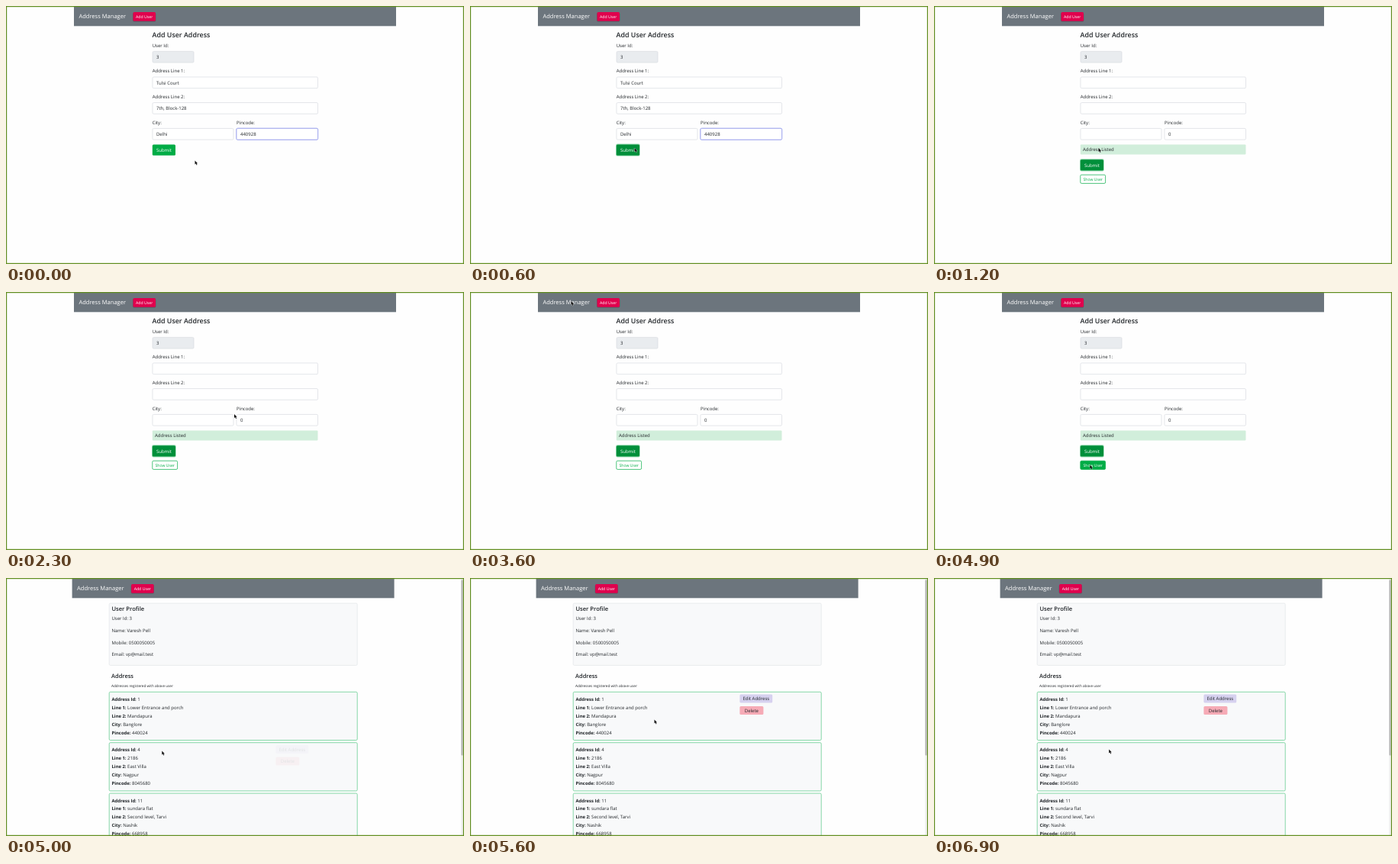
Recreate the animation shown at these times as an HTML page. Size 600 by 338 pixels, loop 7000 ms.

```html
<!DOCTYPE html>
<html>
<head>
<meta charset="utf-8">
<style>
html, body { margin: 0; width: 100%; height: 100%; overflow: hidden; background: #fefefe; }
svg { display: block; width: 600px; height: 338px; }
text { font: 6px "Open Sans", "Noto Sans", sans-serif; fill: #212529; text-rendering: geometricPrecision; white-space: pre; }
</style>
</head>
<body>
<svg id="stage" viewBox="0 0 600 338"></svg>
<script>
const stage = document.getElementById('stage');
const INK = '#212529', GREEN = '#00ac46', DARK = '#008f3a', LINE = '#d8dce1';

const rect = (x, y, w, h, fill, stroke = 'none', r = 1.5, extra = '') =>
  `<rect x="${x}" y="${y}" width="${w}" height="${h}" rx="${r}" fill="${fill}" stroke="${stroke}" stroke-width=".7" ${extra}/>`;
const text = (x, y, str, size = 6, weight = 400, fill = INK, anchor = 'start') =>
  `<text x="${x}" y="${y}" style="font-size:${size}px;font-weight:${weight};fill:${fill}" text-anchor="${anchor}">${str}</text>`;
const group = (id, body) => `<g id="${id}">${body}</g>`;

const nav = x =>
  rect(x, 1, 422, 25.3, '#6c757d', 'none', 0) +
  text(x + 6.4, 15.8, 'Address Manager', 7.55, 400, '#fff') +
  rect(x + 77, 8.8, 30.4, 12, '#000', 'none', 2, 'opacity=".18"') +
  rect(x + 77.5, 8, 29.5, 11.7, '#e0004d') +
  text(x + 92.2, 15.6, 'Add User', 5.2, 400, '#fff', 'middle');

const input = (x, y, w, value = '', fill = '#fff') =>
  rect(x, y, w, 14.7, fill, LINE) + text(x + 5, y + 9.5, value);

const submit = (y, fill, ring) =>
  (ring ? rect(191, y - 1, 31.8, 16.2, '#9bdcb4', 'none', 2.2) : '') +
  rect(191.8, y, 30.2, 14.3, fill) +
  text(206.9, y + 9.3, 'Submit', 6, 400, '#fff', 'middle');

const showUser = (fill, ink) =>
  rect(191.8, 221.2, 32.8, 11.2, fill, GREEN) +
  text(208.2, 228.6, 'Show User', 5.15, 400, ink, 'middle');

const formPage =
  nav(89) +
  text(191.6, 41.3, 'Add User Address', 8.9, 600) +
  text(191.7, 53.6, 'User Id:') + input(192, 59.4, 54, '3', '#e9ecef') +
  text(191.7, 87.3, 'Address Line 1:') + input(192, 93, 216.5) +
  text(191.7, 121, 'Address Line 2:') + input(192, 126.6, 216.5) +
  text(191.7, 154.6, 'City:') + input(192, 160.4, 106) +
  text(302, 154.6, 'Pincode:') + input(302, 160.4, 106.5) +
  group('filled',
    text(197, 102.5, 'Tulsi Court') + text(197, 136.1, '7th, Block-128') + text(197, 169.9, 'Delhi') +
    rect(301.6, 160, 107.3, 15.5, '#fff', '#b9bdf5', 2) +
    rect(302, 160.4, 106.5, 14.7, '#fff', '#8f97ea') + text(307, 169.9, '440928') +
    group('idle', submit(181.5, GREEN)) + group('pressed', submit(181.5, DARK, true))) +
  group('listed',
    text(307, 169.9, '0') +
    rect(191.8, 181.5, 216.7, 13, '#d1eedb', 'none', 1) +
    text(195, 190.2, 'Address Listed') +
    submit(201.2, DARK, true) +
    group('outline', showUser('#fff', GREEN)) + group('solid', showUser(GREEN, '#fff')));

const cards = [
  ['1', 'Lower Entrance and porch', 'Mandapura', 'Banglore', '440024'],
  ['4', '2186', 'East Villa', 'Nagpur', '8045680'],
  ['11', 'sundara flat', 'Second level, Tarvi', 'Nashik', '668958']
];
const labels = ['Address Id:', 'Line 1:', 'Line 2:', 'City:', 'Pincode:'];

const card = (values, i) => {
  const y = 149.3 + i * 66.4;
  const rows = values.map((v, k) => text(138.5, y + 11.4 + k * 10.95,
    `<tspan style="font-size:5.9px;font-weight:700">${labels[k]}</tspan> ${v}`)).join('');
  const actions = group('actions' + i,
    rect(353.4, y + 3.2, 42.8, 11, '#d6d1ef') + text(374.8, y + 10.9, 'Edit Address', 6, 400, INK, 'middle') +
    rect(353.4, y + 18.8, 31, 11, '#f6abb6') + text(368.9, y + 26.5, 'Delete', 6, 400, INK, 'middle'));
  return rect(135.2, y, 325, 63.2, '#f8f9fa', '#55c985') + rows + actions;
};

const profilePage =
  nav(86.6) +
  rect(135.2, 33.1, 325, 81.3, '#f8f9fa', '#e3e5e8') +
  text(138.4, 43.4, 'User Profile', 7.6, 600) +
  ['User Id: 3', 'Name: Varesh Pell', 'Mobile: 0500050005', 'Email: vp@mail.test']
    .map((s, i) => text(138.5, 55.3 + i * 15.67, s)).join('') +
  text(138, 131.3, 'Address', 7.5, 600) +
  text(138, 143.2, 'Addresses registered with above user', 4.65) +
  cards.map(card).join('') +
  rect(596, 1, 3, 336, '#f1f1f1', 'none', 0) +
  rect(596.4, 2.5, 2.2, 230, '#b5b5b5', 'none', 1);

stage.innerHTML =
  rect(0, 0, 600, 338, '#fefefe', 'none', 0) +
  group('form', formPage) + group('profile', profilePage) +
  '<path d="M.6 .6H599.4V337.4H.6Z" fill="none" stroke="#648f24" stroke-width="1.2"/>' +
  group('cursor', '<path d="M0 0V5L1.2 4L2.1 6L3 5.6L2.1 3.7H3.6Z" fill="#111" stroke="#fff" stroke-width=".5" paint-order="stroke"/>');

const el = id => document.getElementById(id);
const show = (id, on) => { el(id).style.display = on ? '' : 'none'; };

// Interpolates [time, ...values] rows.
function track(keys, t) {
  const n = keys.findIndex(k => k[0] > t);
  if (n < 0) return keys[keys.length - 1].slice(1);
  if (n === 0) return keys[0].slice(1);
  const a = keys[n - 1], b = keys[n], u = (t - a[0]) / (b[0] - a[0]);
  return a.slice(1).map((v, i) => v + (b[i + 1] - v) * u);
}

const pointer = [
  [0, 247.5, 202.5], [600, 215.5, 186], [1700, 215.5, 186], [2300, 299, 160],
  [2500, 299, 160], [2800, 115.5, 34], [3300, 115.5, 34], [3600, 132.5, 12],
  [4000, 229, 224], [4200, 229, 224], [4600, 204.3, 226.5], [5000, 204.3, 226.5],
  [5600, 241.5, 185.5], [6500, 241.5, 185.5], [6900, 229.2, 224.5]
];
const fades = [
  [[5200, 0], [5500, 1]],
  [[4950, 0], [5000, .1], [5200, .8], [5500, 0]],
  [[0, 0]]
];

function draw(now) {
  const t = Math.floor(now % 7000 / 100) * 100;
  const [x, y] = track(pointer, t);
  el('cursor').setAttribute('transform', `translate(${x} ${y})`);
  show('cursor', t < 3200 || t >= 3400);
  show('form', t < 5000);
  show('profile', t >= 5000);
  show('filled', t < 1200);
  show('listed', t >= 1200);
  show('idle', t < 500);
  show('pressed', t >= 500);
  show('outline', t < 4400);
  show('solid', t >= 4400);
  fades.forEach((keys, i) => el('actions' + i).setAttribute('opacity', track(keys, t)[0]));
}

const start = performance.now();
(function loop() {
  draw(performance.now() - start);
  requestAnimationFrame(loop);
})();
</script>
</body>
</html>
```
